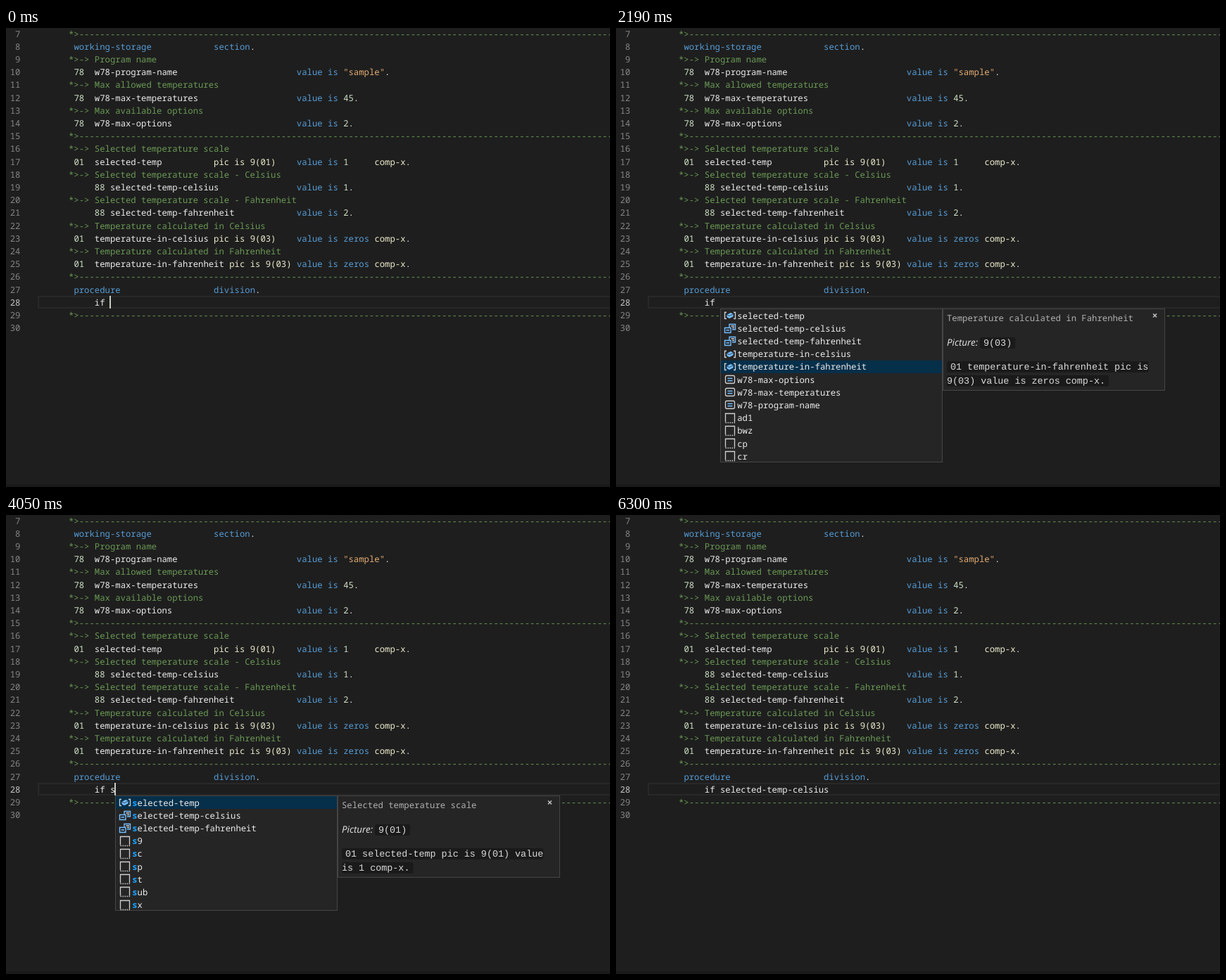
Animation, 858 px wide and 653 px high, one loop 6.68 s. Source, as an HTML page:

```html
<!DOCTYPE html>
<html lang="en">
<head>
<meta charset="utf-8">
<title>Code completion</title>
<style>
  html, body { margin: 0; width: 100%; height: 100%; overflow: hidden; background: #1e1e1e; }
  svg { display: block; width: 858px; height: 653px; }
  text { white-space: pre; text-rendering: geometricPrecision; font: 500 12.28px "Noto Sans Mono", monospace; fill: #ececec; }
  .num { fill: #858585; text-anchor: end; font-weight: 400; }
  .num.on { fill: #c6c6c6; }
  .comment { fill: #6a9955; font-weight: 400; }
  .key { fill: #569cd6; }
  .string { fill: #e3ab73; }
  .type { fill: #ecebcc; }
  .digit { fill: #cfe0c6; }
  .hit { fill: #18a3ff; font-weight: 700; }
  .title { fill: #b0b0b0; font-weight: 400; }
  .label { font: italic 13.4px "Open Sans", sans-serif; fill: #e4e4e4; }
  .code { font: 13.4px "Liberation Mono", monospace; fill: #dadada; }
  .box { fill: #252526; stroke: #454545; }
  .pill { fill: #1a1a1b; }
  .w { fill: none; stroke: #d0d0d0; stroke-width: 1.3; }
  .b { fill: none; stroke: #75beff; stroke-width: 1.4; }
  .solid { fill: #75beff; }
  .edge { fill: none; stroke: #252526; stroke-width: .8; }
  .close { fill: none; stroke: #c4c4c4; stroke-width: 1.5; }
</style>
</head>
<body>
<svg id="stage" viewBox="0 0 858 653"></svg>
<script>
const LOOP = 6680, CHAR = 7.368, ROW = 18.2, MONO = 8.04, LEFT = 44.8;
const stage = document.getElementById('stage');

function el(parent, tag, attrs = {}, text) {
  const node = document.createElementNS('http://www.w3.org/2000/svg', tag);
  for (const k in attrs) node.setAttribute(k, attrs[k]);
  if (text !== undefined) node.textContent = text;
  parent.append(node);
  return node;
}
const rect = (p, x, y, width, height, more) => el(p, 'rect', { x, y, width, height, ...more });
const label = (p, x, y, text, cls = '') => el(p, 'text', { x, y, class: cls }, text);
const path = (p, d, cls) => el(p, 'path', { d, class: cls });

// Editor
const rule = '*>' + '-'.repeat(104);
const row = (name, pic, value, tail = '') =>
  ((' ' + name).padEnd(28) + pic).padEnd(44) + value.padEnd(15) + tail;
const note = s => '*>-> ' + s;
const lines = [
  rule,
  row('working-storage', 'section.', ''),
  note('Program name'),
  row('78  w78-program-name', '', 'value is "sample".'),
  note('Max allowed temperatures'),
  row('78  w78-max-temperatures', '', 'value is 45.'),
  note('Max available options'),
  row('78  w78-max-options', '', 'value is 2.'),
  rule,
  note('Selected temperature scale'),
  row('01  selected-temp', 'pic is 9(01)', 'value is 1', 'comp-x.'),
  note('Selected temperature scale - Celsius'),
  row('    88 selected-temp-celsius', '', 'value is 1.'),
  note('Selected temperature scale - Fahrenheit'),
  row('    88 selected-temp-fahrenheit', '', 'value is 2.'),
  note('Temperature calculated in Celsius'),
  row('01  temperature-in-celsius', 'pic is 9(03)', 'value is zeros', 'comp-x.'),
  note('Temperature calculated in Fahrenheit'),
  row('01  temperature-in-fahrenheit pic is 9(03)', '', 'value is zeros', 'comp-x.'),
  rule,
  row('procedure', 'division.', ''),
  '',
  rule,
  ''
];
const token = /(?<string>"[^"]*")|(?<key>working-storage|section|value is|procedure|division|zeros)|(?<type>pic is|comp-x|9\(\d+\))|(?<digit>(?<![\w-])\d+\b)/g;

function paint(text, source) {
  let last = 0;
  for (const m of source.matchAll(token)) {
    el(text, 'tspan', {}, source.slice(last, m.index));
    el(text, 'tspan', { class: Object.keys(m.groups).find(k => m.groups[k]) }, m[0]);
    last = m.index + m[0].length;
  }
  el(text, 'tspan', {}, source.slice(last));
}

rect(stage, 0, 0, 858, 653, { fill: '#1e1e1e' });
rect(stage, 0, 649, 858, 4, { fill: '#1a1a1a' });
rect(stage, 46, 382, 820, 16, { fill: 'none', stroke: '#282828', 'stroke-width': 2 });
lines.forEach((source, i) => {
  const y = Math.round(12.5 + ROW * i), comment = source.startsWith('*>');
  label(stage, 20.4, y, i + 7, i === 21 ? 'num on' : 'num');
  const text = label(stage, LEFT + 6 * CHAR, y, '', comment ? 'comment' : '');
  if (comment) text.textContent = source;
  else paint(text, source);
});
const input = label(stage, LEFT + 11 * CHAR, 395, '');
const popup = el(stage, 'g');
const caret = rect(stage, 0, 381, 2, 18, { fill: '#c8cbc4' });

// Suggestions
const item = (kind, name, title, code, picture) => ({ kind, name, title, code, picture });
const items = [
  item('field', 'selected-temp', 'Selected temperature scale',
    '01 selected-temp pic is 9(01) value is 1 comp-x.', '9(01)'),
  item('level', 'selected-temp-celsius', 'Selected temperature scale - Celsius',
    '88 selected-temp-celsius value is 1.'),
  item('level', 'selected-temp-fahrenheit', 'Selected temperature scale - Fahrenheit',
    '88 selected-temp-fahrenheit value is 2.'),
  item('field', 'temperature-in-celsius', 'Temperature calculated in Celsius',
    '01 temperature-in-celsius pic is 9(03) value is zeros comp-x.', '9(03)'),
  item('field', 'temperature-in-fahrenheit', 'Temperature calculated in Fahrenheit',
    '01 temperature-in-fahrenheit pic is 9(03) value is zeros comp-x.', '9(03)'),
  item('const', 'w78-max-options', 'Max available options', '78 w78-max-options value is 2.'),
  item('const', 'w78-max-temperatures', 'Max allowed temperatures', '78 w78-max-temperatures value is 45.'),
  item('const', 'w78-program-name', 'Program name', '78 w78-program-name value is "sample".'),
  ...'ad1 bwz cp cr s9 sc sp st sub sx'.split(' ').map(name => item('snippet', name))
];

// Icons are drawn around the middle of a 16px cell.
const icons = {
  field(g) {
    path(g, 'M-5-4.5h-2.5v9h2.5M5-4.5h2.5v9h-2.5', 'w');
    path(g, 'M-4.5-1L1-4L4.5-2V1.5L-1 4.2L-4.5 2.2Z', 'solid');
    path(g, 'M-4-.8L-1 .7L4-1.8', 'edge');
  },
  level(g) {
    path(g, 'M-1-1V-5.5H7.5V2H3', 'b');
    path(g, 'M1.5-3H6M3-.5H6', 'w');
    path(g, 'M-7.5-.5H1V6.5H-7.5ZM-5.5 3H-1', 'b');
  },
  const(g) {
    rect(g, -6.5, -5.5, 13, 11, { rx: 2, class: 'w' });
    path(g, 'M-3.5-1.5h7M-3.5 1.8h7', 'b');
  },
  snippet(g) {
    path(g, 'M-6.5 5.5V-6.5H6.5V5.5', 'w');
    path(g, 'M-6.5 6.5H7', 'w').setAttribute('stroke-dasharray', '1.5 1.5');
  }
};

function wrap(text, max = 36) {
  return text.split(' ').reduce((out, word) => {
    const joined = out.length ? out[out.length - 1] + ' ' + word : word;
    if (out.length && joined.length <= max) out[out.length - 1] = joined;
    else out.push(word);
    return out;
  }, []);
}

function pill(x, y, text, first, last) {
  const pad = first ? 5 : 0, width = text.length * MONO;
  rect(popup, x, y - 8, pad + width + (last ? 5 : 0), 16, { rx: 3, class: 'pill' });
  label(popup, x + pad, y + 4, text, 'code');
}

function drawDocs(x, it) {
  const title = wrap(it.title), code = wrap(it.code);
  let y = 448 + (title.length - 1) * 19;
  const bottom = y + (it.picture ? 34 : 0) + code.length * 20 - 6;
  rect(popup, x + .5, 399.5, 315, bottom - 400, { class: 'box' });
  title.forEach((s, i) => label(popup, x + 6, 417 + i * 19, s, 'title'));
  path(popup, `M${x + 299} 406.5l5 5m0-5l-5 5`, 'close');
  if (it.picture) {
    label(popup, x + 6, y + 4, 'Picture:', 'label');
    pill(x + 53, y, it.picture, true, true);
    y += 34;
  }
  code.forEach((s, i) => pill(x + 6, y + i * 20, s, i === 0, i === code.length - 1));
}

function drawPopup(typed, selected, bar) {
  popup.replaceChildren();
  if (selected < 0) return;
  const prefix = 'selec'.slice(0, typed);
  const list = items.filter(it => it.name.startsWith(prefix)).slice(0, 12);
  const x = Math.round(148 + CHAR * typed);
  rect(popup, x + .5, 399.5, 315, Math.floor(list.length * ROW), { class: 'box' });
  list.forEach((it, i) => {
    const top = 400 + i * ROW;
    if (i === selected) rect(popup, x + 1, Math.round(top), 314, 18, { fill: '#062f4a' });
    const g = el(popup, 'g', { transform: `translate(${x + 14} ${Math.round(top + 9)})` });
    icons[it.kind](g);
    const text = label(popup, x + 24.2, Math.round(top + 13.5), '');
    el(text, 'tspan', { class: 'hit' }, prefix);
    el(text, 'tspan', {}, it.name.slice(typed));
  });
  if (bar) rect(popup, x + 306, 400, 9, 52, { fill: '#797979', opacity: bar });
  drawDocs(x + 316, list[selected]);
}

// Timeline: [ms, typed characters, popup offset, selected row, scrollbar opacity]
const steps = [
  [0, 0, 0, -1, 0], [240, 0, 0, 0, .4], [1020, 0, 0, 0, .28],
  [1320, 0, 0, 1, 0], [1550, 0, 0, 2, 0], [1870, 0, 0, 3, 0], [2190, 0, 0, 4, 0],
  [2510, 0, 0, 5, 0], [2810, 0, 0, 6, 0], [3120, 0, 0, 7, 0],
  [4050, 1, 1, 0, 0], [4280, 2, 2, 0, 0], [4450, 3, 3, 0, 0], [4600, 4, 4, 0, 0],
  [4680, 5, 4, 0, 0], [4750, 5, 5, 0, 0], [5150, 5, 5, 1, 0], [5840, 21, 0, -1, 0]
];
const blinks = [70, 560, 1090, 1550, 2040, 2580, 3040, 3500, 5230, 5690, 6300];

let shown;
function show(t) {
  const step = steps.findLast(s => s[0] <= t);
  if (step !== shown) {
    const [, typed, offset, selected, bar] = shown = step;
    input.textContent = 'if ' + 'selected-temp-celsius'.slice(0, typed);
    caret.setAttribute('x', Math.floor(147.3 + CHAR * typed));
    drawPopup(offset, selected, bar);
  }
  const off = blinks.filter(b => b <= t).length % 2;
  caret.setAttribute('visibility', off ? 'hidden' : 'visible');
}

const start = performance.now();
function tick() {
  show((performance.now() - start) % LOOP);
  requestAnimationFrame(tick);
}
tick();
</script>
</body>
</html>
```
